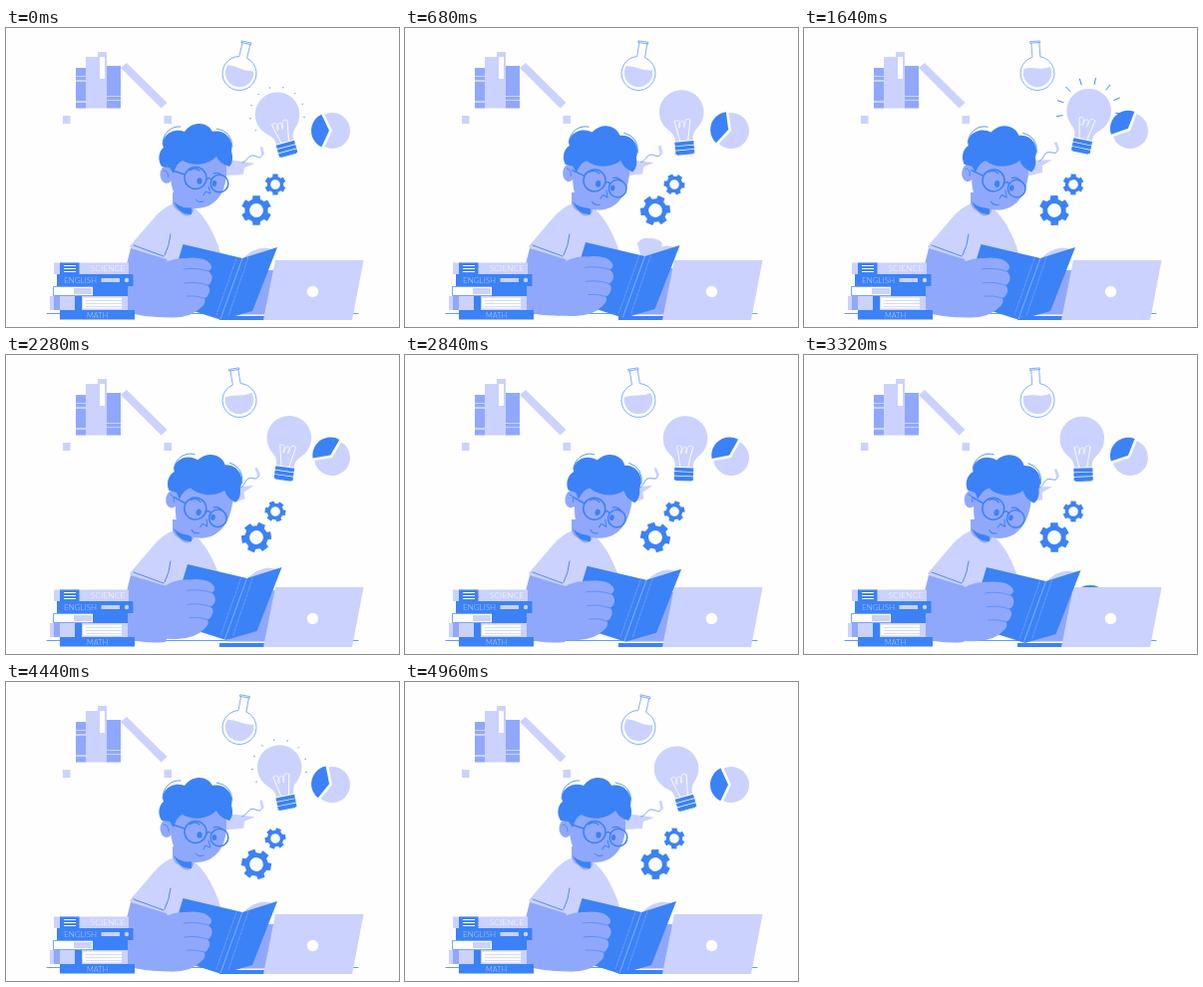
An HTML page with a canvas that plays this animation: 394 by 300 pixels, repeating every 5000 ms.

```html
<!DOCTYPE html>
<html lang="en">
<head>
<meta charset="utf-8">
<style>
html, body { margin: 0; width: 100%; height: 100%; overflow: hidden; background: #fefefe; }
canvas { display: block; width: 394px; height: 300px; }
</style>
</head>
<body>
<canvas id="stage"></canvas>
<script>
const LOOP = 5000, TAU = Math.PI * 2, RAD = Math.PI / 180;
const DARK = '#3b82f6', MID = '#90a8fb', LIGHT = '#cbd2fd', WHITE = '#fefefe';
const canvas = document.getElementById('stage');
const c = canvas.getContext('2d');
const dpr = window.devicePixelRatio || 1;
canvas.width = 394 * dpr;
canvas.height = 300 * dpr;

const fill = (color, d) => { c.fillStyle = color; c.fill(new Path2D(d)); };
const line = (color, width, d) => {
  c.strokeStyle = color;
  c.lineWidth = width;
  c.stroke(new Path2D(d));
};
const rect = (color, x, y, w, h) => { c.fillStyle = color; c.fillRect(x, y, w, h); };
const disc = (color, x, y, rx, ry = rx) => {
  c.fillStyle = color;
  c.beginPath();
  c.ellipse(x, y, rx, ry, 0, 0, TAU);
  c.fill();
};
const ring = (color, width, x, y, r) => {
  c.strokeStyle = color;
  c.lineWidth = width;
  c.beginPath();
  c.arc(x, y, r, 0, TAU);
  c.stroke();
};
const label = (text, x, y, size, color) => {
  c.fillStyle = color;
  c.font = `300 ${size}px Lato, sans-serif`;
  c.textAlign = 'center';
  c.fillText(text, x, y);
};
// Draws in a frame moved to (x, y) and turned by deg.
const at = (x, y, deg, draw) => {
  c.save();
  c.translate(x, y);
  c.rotate(deg * RAD);
  draw();
  c.restore();
};
// Eased value between [time, value] keys.
const tween = (t, keys) => {
  const i = keys.findIndex(k => k[0] > t);
  if (i < 1) return keys[i < 0 ? keys.length - 1 : 0][1];
  const [t0, a] = keys[i - 1], [t1, b] = keys[i];
  return a + (b - a) * (1 - Math.cos(Math.PI * (t - t0) / (t1 - t0))) / 2;
};
const pulse = (t, start, length) =>
  t > start && t < start + length ? Math.sin(Math.PI * (t - start) / length) : 0;

function shelf() {
  rect(MID, 70, 40, 10, 40.5);
  rect(LIGHT, 70, 48, 10, 1);
  rect(LIGHT, 70, 52, 10, 2);
  rect(LIGHT, 70, 73, 10, 2);
  rect(LIGHT, 80, 29, 13, 51.5);
  rect(LIGHT, 92, 24, 9, 56.5);
  rect(WHITE, 94, 29, 5, 22);
  rect(MID, 101, 38, 14, 42.5);
  rect(LIGHT, 101, 68, 14, 1);
  rect(LIGHT, 101, 72, 14, 1);
  fill(LIGHT, 'M115 40L121 35L161.5 75L155.5 80.5Z');
  rect(LIGHT, 57, 88, 7.5, 8);
  rect(LIGHT, 158.5, 88, 7.5, 8);
}

function flask(wave) {
  at(234, 45.5, 1.5 + 11.5 * wave, () => {
    const glass = 'M-4 -31L-4 -16.5A17 17 0 1 0 4 -16.5L4 -31Z';
    const lip = 'M-4.8 -32.3H4.8V-30.7H-4.8Z';
    [glass, lip].forEach(d => {
      fill(WHITE, d);
      line(DARK, 0.6, d);
    });
    fill(LIGHT, 'M-13.3 -5.5Q-7 -6.5 0 -5T13.3 -5.5A14.2 14.2 0 1 1 -13.3 -5.5Z');
  });
}

function bulb(t) {
  const tilt = tween(t, [[0, -15.5], [680, -5], [1750, 12], [2280, 8], [3320, -2], [4000, -8], [5000, -15.5]]);
  const glow = Math.max(pulse(t, -10, 450), pulse(t, 1370, 540), pulse(t, 3940, 520));
  const drop = 0.3 - tilt * 0.11;
  at(279.5 + drop, 119 + drop, tilt, () => {
    fill(LIGHT, 'M-9 -7C-9 -14 -12 -16 -16 -20A22.3 22.3 0 1 1 16 -20C12 -16 9 -14 9 -7Z');
    line(WHITE, 0.9, 'M-4 -7L-8 -27M4 -7L8 -27');
    line(WHITE, 0.7, 'M-8 -27Q-4 -30 -3 -25Q-2 -20 -4 -20Q-5 -24 0 -27Q4 -25 1 -20Q0 -24 4 -28Q7 -29 8 -27');
    for (let y = -6; y < 6; y += 4.4) rect(DARK, -9.5, y, 19, 3.7);
    rect(DARK, -8, 6, 16, 1.2);
    if (glow) {
      c.strokeStyle = DARK;
      c.lineWidth = 0.9;
      for (let i = 0; i < 9; i++) {
        const a = (-202 + i * 28) * RAD, near = 27, far = near + 6 * glow;
        c.beginPath();
        c.moveTo(near * Math.cos(a), -36 + near * Math.sin(a));
        c.lineTo(far * Math.cos(a), -36 + far * Math.sin(a));
        c.stroke();
      }
    }
  });
}

function pie(t) {
  const sector = (color, x, from, to) => {
    c.fillStyle = color;
    c.beginPath();
    c.moveTo(x, 0);
    c.arc(x, 0, 18, from * RAD, to * RAD);
    c.fill();
  };
  at(327, 103, 56 * Math.sin(Math.PI * t / LOOP) ** 1.3, () => {
    sector(LIGHT, 0, -115, 115);
    sector(DARK, -3, 115, 245);
  });
}

function gear(x, y, r, deg) {
  at(x, y, deg, () => {
    c.fillStyle = DARK;
    c.beginPath();
    for (let i = 0; i < 6; i++) {
      [[-19, 0.77], [-14, 1], [14, 1], [19, 0.77]].forEach(([off, k]) => {
        const a = (i * 60 + off) * RAD;
        c.lineTo(r * k * Math.cos(a), r * k * Math.sin(a));
      });
    }
    c.fill();
    disc(WHITE, 0, 0, r * 0.45);
  });
}

function cap(wave) {
  at(228, 140, -7 + 7 * wave, () => {
    fill(LIGHT, 'M-12 -9L22 -4L11 0L10 7L-8 8Z');
    line(DARK, 0.7, 'M9 -5C14 -6 15 -13 20 -12S27 -8 29 -13Q30 -17 28 -20');
    fill(LIGHT, 'M27 -20L29.5 -21L31 -13L28.5 -11Z');
  });
}

function torso() {
  fill(LIGHT, 'M171 175Q158 179 148 191L124 219L132 234L161 250H222L213 219Q202 190 187 179Z');
  fill(MID, 'M167 165H188V184Q182 193 174 184Q168 181 167 176Z');
  fill(DARK, 'M168 174Q176 182 186 180V187Q174 188 168 174Z');
  line(DARK, 0.9, 'M165 207Q164 218 159 228M128 218L158 229');
}

function head(k) {
  at(178, 178, 11 * k, () => {
    c.translate(-178, -178);
    fill(MID, 'M164 132C164 160 168 180 190 181C211 181 222 164 221 140L213 112H170Z');
    disc(MID, 161, 147, 6.5, 9);
    line(DARK, 0.8, 'M158 143Q163 143 163 150');
    fill(DARK, 'M156 139C151 131 154 123 158 120C154 109 167 99 179 104C188 92 203 95 207 104C220 101 229 113 226 124C228 130 227 136 224 139C218 137 214 135 211 129C202 138 187 139 177 133Q171 135 168 146L164 140Z');
    line(DARK, 0.8, 'M157 117C157 104 167 98 175 99M211 101Q226 103 227 119');
    c.translate(-5 * k, 2 * k);
    line(DARK, 1.5, 'M167 143L179 147M201 152Q203 149 206 152');
    ring(DARK, 1.5, 190, 150.5, 11);
    ring(DARK, 1.5, 214, 156, 8.8);
    disc(DARK, 194, 153.5, 2.6, 3.3);
    disc(DARK, 209, 156, 2.3, 3);
    line(DARK, 1.3, 'M184 143Q189 139 194 143M208 146Q213 144 217 148');
    line(DARK, 1, 'M203 159L205 166L200 164L198 168M190 172Q193 176 198 174');
  });
}

function laptop() {
  rect(DARK, 214, 289, 50, 4);
  fill(LIGHT, 'M270 233H358.5L347 293H258Z');
  disc(WHITE, 307.5, 264.5, 5.7);
}

function turningPage(t) {
  const p = (t - 450) / 660;
  if (p <= 0 || p >= 1) return;
  const x = 268 - 76 * p, y = 222 - 9 * Math.sin(Math.PI * Math.min(1, p * 1.4));
  fill(LIGHT, `M238 250L${x - 12} ${y + 5}Q${x - 8} ${y - 1} ${x} ${y}Q${x + 10} ${y} ${x + 13} ${y + 5}L${x + 6} 245Z`);
}

function book() {
  fill(LIGHT, 'M237 232Q247 221 259 220.5L268 222Z');
  fill(DARK, 'M177.5 217L237 231L272 220L247 284L216 293L160 275Z');
  line(LIGHT, 0.5, 'M237 231L215 292');
  c.setLineDash([3, 1.5]);
  line(MID, 0.6, 'M231 231L211 288M243 230L223 289');
  c.setLineDash([]);
}

function hand() {
  fill(MID, 'M150 242Q163 230 180 231Q199 229 205 237Q208 241 203 244Q208 248 206 254Q205 257 202 258Q206 262 203 267Q202 270 199 271Q201 276 196 280Q187 290 168 290.5Q138 291 118 284V268Z');
  line(DARK, 0.6, 'M178 242Q190 240 203 244M179 256Q190 254 202 258M181 269Q190 268 199 271');
}

function stack() {
  rect(LIGHT, 48, 235.5, 75, 11.5);
  rect(DARK, 54, 235.5, 19.5, 11.5);
  [238, 241, 244].forEach(y => rect(WHITE, 58, y, 12, 1));
  label('SCIENCE', 102, 244, 8.5, WHITE);

  rect(DARK, 51, 247, 76.5, 12);
  label('ENGLISH', 74.5, 256, 8, LIGHT);
  rect(LIGHT, 95.5, 251, 18.5, 4);
  disc(LIGHT, 121, 253, 2.2);

  rect(WHITE, 47, 259, 40, 10);
  line(DARK, 0.7, 'M87 259.5H47.5V268.5H87');
  rect(LIGHT, 68, 261, 18, 6);
  rect(DARK, 87, 259, 35, 10);

  rect(LIGHT, 44, 269, 78, 14);
  rect(MID, 48, 269, 6, 14);
  rect(DARK, 69, 269, 7, 14);
  rect(WHITE, 77, 270.5, 39, 11);
  [273, 276, 279].forEach(y => rect(LIGHT, 80, y, 36, 0.8));

  rect(DARK, 54, 283, 75, 9.5);
  label('MATH', 91.5, 290.5, 7.5, LIGHT);
}

function draw(t) {
  const wave = Math.cos(TAU * t / LOOP), turn = t / LOOP * 180;
  const nod = tween(t, [[0, 0], [600, 0.6], [1640, 0.6], [2280, 0.93], [3320, 1], [3960, 0], [5000, 0]]);
  const dx = tween(t, [[0, 0], [680, 3.5], [1640, 0], [2280, 4.5], [3320, 5.5], [3960, 0]]);
  const dy = tween(t, [[0, 0], [680, -2], [1640, 0], [2280, -7], [3320, -4], [3960, 0]]);
  const reach = tween(t, [[2400, 0], [3300, 1], [3900, 0]]);

  c.setTransform(dpr, 0, 0, dpr, 0, 0);
  rect(WHITE, 0, 0, 394, 300);
  c.lineCap = c.lineJoin = 'round';

  shelf();
  flask(wave);
  pie(t);
  bulb(t);
  gear(270, 157, 10.7, 30 - turn);
  gear(251, 183, 15.3, 30 + turn);
  cap(wave);
  line(DARK, 0.8, 'M41 286.5H353');
  torso();
  head(nod);
  if (reach > 0) disc(DARK, 287, 241 - 5 * reach, 11, 5);
  fill(MID, `M${235 + dx} ${243 + dy}H${269 + dx}L260 287.5H222Z`);
  laptop();
  // Upper arm stays anchored at the sleeve.
  fill(MID, 'M125 221L161 232L171 255L160 288Q138 290 120 284L118 249Z');
  c.save();
  c.translate(dx, dy);
  turningPage(t);
  book();
  c.restore();
  c.save();
  c.translate(dx * 0.7, dy * 0.8);
  hand();
  c.restore();
  stack();
}

function tick() {
  draw(performance.now() % LOOP);
  requestAnimationFrame(tick);
}
tick();
</script>
</body>
</html>
```
